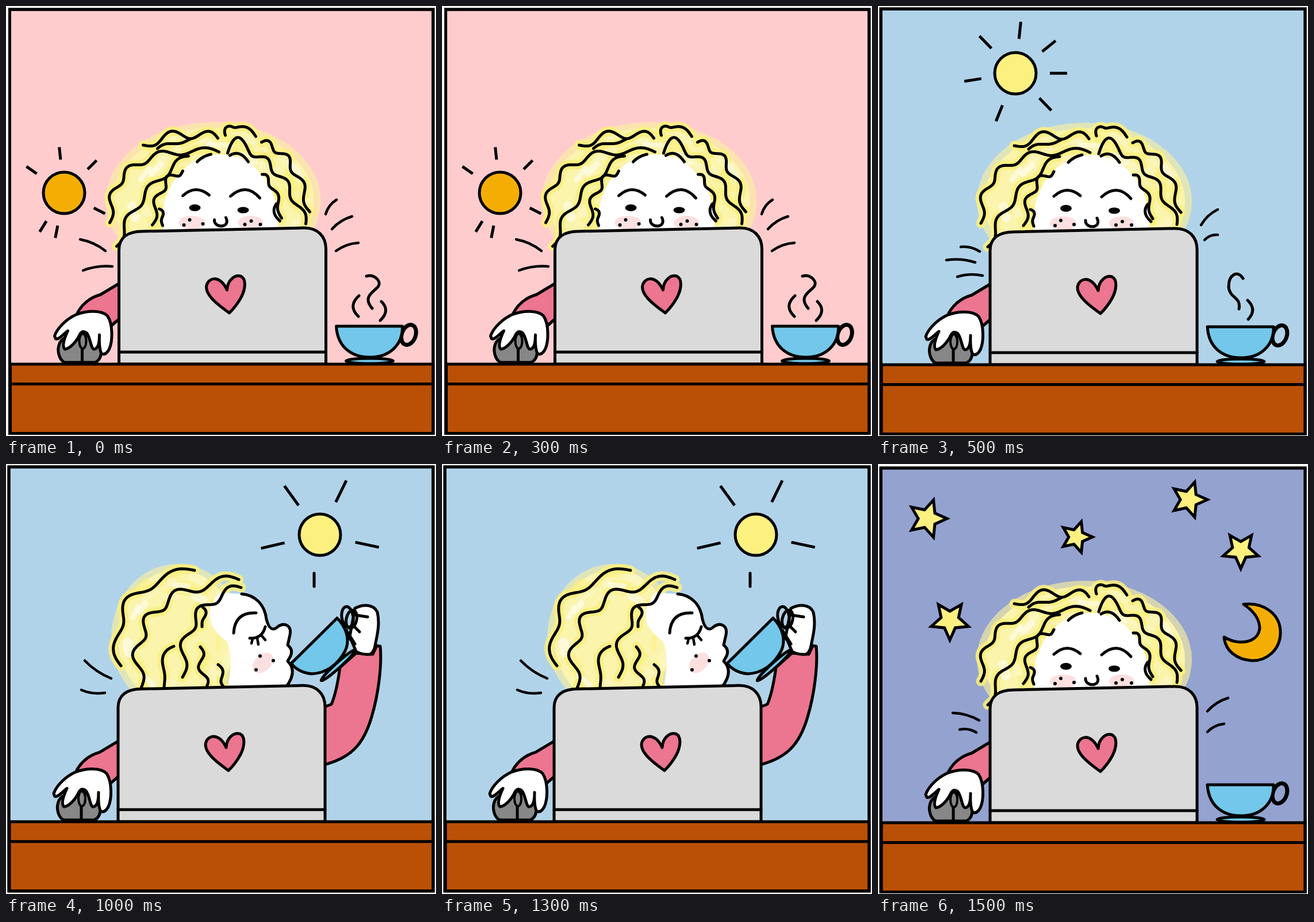
Recreate the animation shown at these times as an HTML page. Size 748x748 px, loop 2000 ms.

```html
<!DOCTYPE html>
<html lang="en">
<head>
<meta charset="utf-8">
<title>A working day</title>
<style>
  html, body { margin: 0; width: 100%; height: 100%; overflow: hidden; background: #fff; }
  svg { display: block; width: 100vw; height: 100vh; }
  .ink { stroke: #000; stroke-width: 5; }
  .round { stroke-linecap: round; stroke-linejoin: round; }
</style>
</head>
<body>
<svg id="stage" viewBox="0 0 748 748"></svg>
<script>
const GOLD = '#f4ae03', LEMON = '#fcf07e', PALE = '#fcf8cc', BLUSH = '#fce0e0';
const PINK = '#ec7590', BLUE = '#72c7ea', GREY = '#878787';
const FRAME_MS = 500, TAU = Math.PI * 2;

const shape = (d, fill = 'none', attrs = '') => `<path class="ink round" fill="${fill}" d="${d}" ${attrs}/>`;
const spot = (x, y, rx, ry, fill = '#000', turn = 0, attrs = '') =>
  `<ellipse cx="${x}" cy="${y}" rx="${rx}" ry="${ry}" fill="${fill}" transform="rotate(${turn} ${x} ${y})" ${attrs}/>`;
const ring = (x, y, rx, ry, fill, turn, width = 5) => spot(x, y, rx, ry, fill, turn, `class="ink" style="stroke-width:${width}"`);
const freckles = list => list.map(([x, y]) => spot(x, y, 3, 3)).join('');

// Shallow arc; a positive rise bulges upwards when drawn from left to right.
function bow(x0, y0, x1, y1, rise = 3, width = 5) {
  const dx = x1 - x0, dy = y1 - y0, k = 2 * rise / Math.hypot(dx, dy);
  return shape(`M${x0} ${y0}Q${(x0 + x1) / 2 + dy * k} ${(y0 + y1) / 2 - dx * k} ${x1} ${y1}`, 'none', `style="stroke-width:${width}"`);
}
const dashes = (list, rise) => list.map(p => bow(...p, rise, 4.5)).join('');

// Sine wave laid along a quadratic curve.
function strand([x0, y0, cx, cy, x1, y1, waves, amp]) {
  const points = [];
  for (let i = 0; i <= 60; i++) {
    const t = i / 60, u = 1 - t;
    const dx = u * (cx - x0) + t * (x1 - cx), dy = u * (cy - y0) + t * (y1 - cy);
    const k = amp * Math.sin(TAU * waves * t) / Math.hypot(dx, dy);
    points.push([u * u * x0 + 2 * u * t * cx + t * t * x1 - dy * k, u * u * y0 + 2 * u * t * cy + t * t * y1 + dx * k]
      .map(v => v.toFixed(1)));
  }
  return 'M' + points.join('L');
}

// Soft ball of hair: sheer edge, solid middle, seeded brush streaks, a bright band under each strand.
function hair(x, y, rx, ry, strands) {
  let seed = 7;
  const random = () => (seed = seed * 16807 % 2147483647) / 2147483647;
  let out = spot(x, y, rx, ry, '#f9f0a0', 0, 'opacity=".65"') + spot(x, y, rx - 12, ry - 10, '#fbf4ad');
  const brush = (d, color, width, opacity) =>
    shape(d, 'none', `style="stroke:${color};stroke-width:${width};opacity:${opacity}"`);
  strands.forEach(s => out += brush(strand(s), LEMON, 17, .85));
  for (let i = 0; i < 34; i++) {
    const a = TAU * random(), r = .55 + .35 * random(), b = a + .15 + .2 * random();
    const at = v => `${x + rx * r * Math.cos(v)} ${y + ry * r * Math.sin(v)}`;
    out += brush(`M${at(a)}L${at(b)}`, [PALE, PALE, LEMON, '#fff'][i % 4], 6 + 12 * random(), .55);
  }
  return out;
}
const outlines = strands => strands.map(s => shape(strand(s))).join('');

const sun = (x, y, fill, near, far, angles) => ring(x, y, 36, 36, fill) + angles.map(deg => {
  const c = Math.cos(deg * TAU / 360), s = Math.sin(deg * TAU / 360);
  return `<path class="ink" d="M${x + near * c} ${y + near * s}L${x + far * c} ${y + far * s}"/>`;
}).join('');

function star(x, y, r, turn) {
  const points = Array.from({ length: 10 }, (_, i) => {
    const a = turn + i * TAU / 10, q = i % 2 ? r * .47 : r;
    return [x + q * Math.cos(a), y + q * Math.sin(a)];
  });
  return `<polygon class="ink" fill="${LEMON}" stroke-miterlimit="8" points="${points.join(' ')}"/>`;
}

// Each strand: start, control, end, number of waves, amplitude.
const frontStrands = [
  [237, 243, 305, 212, 367, 231, 2, 8], [262, 249, 285, 240, 318, 233, 1, -3],
  [179, 378, 175, 238, 369, 255, 4, 6], [191, 419, 226, 320, 316, 262, 3, 6],
  [331, 272, 341, 262, 355, 259, 0, 0], [253, 382, 262, 300, 306, 288, 2.5, 6],
  [265, 354, 274, 365, 271, 383, 1, -3], [380, 226, 387, 190, 433, 228, 1.5, -4],
  [443, 238, 501, 252, 527, 359, 3, -6], [384, 257, 400, 205, 420, 252, 0, 0],
  [420, 252, 482, 280, 520, 380, 3, 6], [388, 261, 405, 250, 420, 272, 0, 0],
  [444, 294, 468, 310, 478, 370, 2, -4], [469, 345, 458, 360, 475, 375, 0, 0]
];
const frontHead =
  hair(359, 340, 187, 137, frontStrands) + spot(371, 375, 101, 116, '#fff') +
  spot(322, 378, 23, 12, BLUSH) + spot(424, 378, 22, 12, BLUSH) + outlines(frontStrands) +
  bow(306, 331, 352, 330, 10) + bow(389, 332, 440, 335, 13) +
  shape('M361 373C360 388 390 388 381 369') + spot(327, 352, 10, 6) + spot(411, 356, 10, 5.5) +
  freckles([[318, 373], [308, 382], [341, 380], [425, 375], [414, 381], [441, 381]]);

const sideStrands = [
  [200, 351, 164, 212, 328, 185, 2.5, -8], [235, 390, 196, 220, 405, 201, 4, 9],
  [307, 371, 302, 243, 409, 215, 3, 8], [275, 390, 262, 345, 292, 317, 1, 5],
  [342, 249, 350, 265, 341, 283, 1, -3], [349, 388, 338, 355, 338, 318, 1.5, 6],
  [379, 388, 378, 370, 369, 349, 1, -4]
];
const profile = 'M410 226C434 228 450 245 453 270C458 290 466 290 474 282C486 275 497 282 494 297L490 315Q500 323 495 334L490 343Q508 361 487 388';
const sideHead =
  hair(298, 302, 115, 128, sideStrands) +
  `<path fill="#fff" d="${profile}L480 400H383Q398 340 384 308C350 286 345 250 372 224Z"/>` +
  spot(447, 346, 21, 14, BLUSH, -45) + outlines(sideStrands) + shape(profile) +
  bow(396, 294, 435, 259, 13) + bow(424, 303, 451, 283, -7) +
  dashes([[429, 304, 427, 312], [437, 303, 439, 314], [445, 299, 451, 306]], 0) +
  freckles([[442, 334], [465, 342], [435, 358]]);

const drinkingArm =
  shape('M550 424L566 418C574 400 578 375 581 354L609 329L638 331L645 316L651 317C654 350 648 400 636 440C622 488 600 512 550 524Z', PINK) +
  shape('M607 251C622 243 640 244 646 258C651 280 645 300 642 316Q640 328 633 331Q618 332 609 326L598 300Z', '#fff') +
  shape('M496 347L576 268C592 284 599 306 590 325C577 350 556 364 532 365Q509 363 496 347Z', BLUE) +
  ring(578, 350, 40, 4.5, BLUE, -42) + ring(594, 266, 10, 18, 'none', -8) + ring(601, 270, 9, 16, 'none', 12) +
  shape('M603 262L629 266M607 284L615 292M592 289L607 313L596 302');

const mouseArm =
  shape('M198 482L163 503C145 508 130 520 121 538L182 557L198 543Z', PINK) +
  shape('M92 587C86 600 91 616 100 621H154Q165 615 164 600C155 565 105 565 92 587Z', GREY) + shape('M131 597V621') +
  shape('M83 575C88 560 105 545 120 538C140 530 165 530 175 540C185 555 184 585 178 598Q172 609 165 606Q160 598 161 573Q161 598 151 598C146 596 146 580 139 570Q132 564 127 572C121 585 110 597 101 598Q94 592 106 566C98 572 90 582 85 580Z', '#fff') +
  ring(132, 584, 6, 13, GREY, 0, 4);

const laptop =
  shape('M195 624V425C195 404 210 393 236 393L515 387C541 386 555 402 555 424V624Z', '#dadada') + shape('M195 603H555') +
  shape('M387 535C366 520 347 505 347 490C348 474 370 466 383 495C384 477 397 468 407 471C417 476 415 493 408 507Q400 522 387 535Z', PINK);

const cup = ring(699, 573, 12, 18, 'none', 20, 7) + ring(631, 618.5, 41, 4.5, BLUE) +
  shape('M573 558H688C689 591 665 612 632 612C598 612 575 593 573 558Z', BLUE);

const scenes = [
  { sky: '#ffccce', shift: [1.5, -1], top: 6, head: frontHead, cup, extras:
    sun(101, 325, GOLD, 58, 80, [-96, -45, -145, 27, 122, 101]) +
    dashes([[556, 362, 575, 337], [567, 388, 602, 366], [574, 426, 613, 412], [129, 406, 173, 426], [134, 460, 185, 453]]) +
    shape('M627 470C640 466 653 478 648 487S618 504 637 526M614 504Q594 522 613 540M653 514Q669 530 651 547') },
  { sky: '#b1d3e9', shift: [0, 0], top: 5, head: frontHead, cup, extras:
    sun(239, 117, LEMON, 60, 90, [0, 46, 112, 171, -134, -84, -39]) +
    dashes([[562, 381, 591, 354], [568, 407, 591, 398], [144, 419, 177, 427], [119, 442, 169, 446], [138, 471, 182, 469]]) +
    shape('M635 474C625 458 610 468 610 488C611 509 632 505 628 527M643 512Q660 528 644 545') },
  { sky: '#b1d3e9', shift: [0, -1.7], top: 5, head: '', cup: '', extras:
    sun(546, 123, LEMON, 63, 105, [-126, -64, 167, 12]) + shape('M536 190V213') +
    dashes([[137, 342, 183, 373], [131, 393, 172, 398]], -3) + sideHead + drinkingArm },
  { sky: '#94a2d0', shift: [0, 0], top: 7, head: frontHead, cup, extras:
    star(86, 95, 34, 0) + star(345, 127, 28, 0) + star(541, 62, 32, 0) +
    star(631, 150, 32, TAU / 4) + star(125, 272, 34, TAU / 4) +
    shape('M636 244C672 240 700 262 700 293C700 324 675 343 650 342C624 340 604 325 602 301C628 317 662 311 664 285Q663 262 636 244Z', GOLD) +
    dashes([[573, 430, 609, 407], [573, 466, 602, 452], [130, 433, 176, 446], [142, 462, 171, 467]]) }
];

const stage = document.getElementById('stage');
stage.innerHTML = scenes.map(({ sky, shift: [x, y], top, head, cup, extras }) => {
  const left = 5 + x, bottom = 744.5 + y;
  const frame = `<rect class="ink" x="${left}" y="${top}" width="${743 - left}" height="${bottom - top}"`;
  return `<g>${frame} fill="${sky}"/>${extras}
    <g transform="translate(${x} ${y})">${head}${mouseArm}${laptop}${cup}</g>
    <path class="ink" fill="#ba5005" d="M${left + 1} ${624 + y}H743V${bottom}H${left + 1}ZM${left + 1} ${658.5 + y}H743"/>
    ${frame} fill="none"/></g>`;
}).join('');

const views = [...stage.children];
function tick() {
  const current = Math.floor(performance.now() / FRAME_MS) % views.length;
  views.forEach((view, i) => view.style.display = i === current ? '' : 'none');
  requestAnimationFrame(tick);
}
tick();
</script>
</body>
</html>
```
